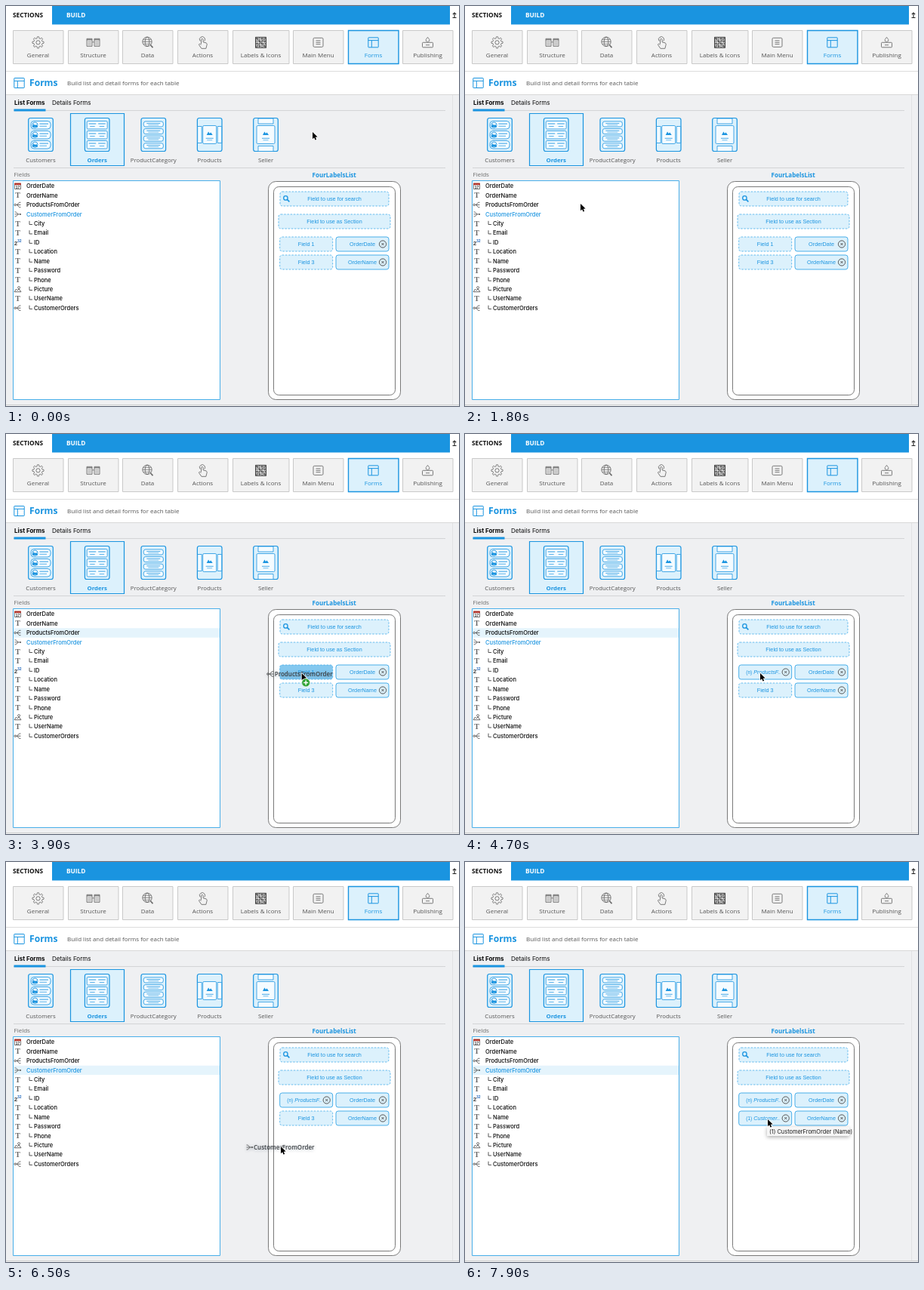
Recreate the animation shown at these times as an HTML page with a canvas. Size 600 by 530 pixels, loop 8000 ms.

```html
<!DOCTYPE html>
<html lang="en">
<head>
<meta charset="utf-8">
<title>Form builder</title>
<style>
html, body { margin: 0; width: 100%; height: 100%; overflow: hidden; background: #fff; }
canvas { display: block; width: 600px; height: 530px; }
</style>
</head>
<body>
<canvas id="stage"></canvas>
<script>
const W = 600, H = 530, LOOP = 8000;
const BLUE = '#1a94e0', SOFT = '#48aee9', PALE = '#dcf1fc', GREY = '#6b6b6b', INK = '#080808';
const SANS = '"Open Sans", "Noto Sans", sans-serif';
const UI = 'Inter, Roboto, sans-serif';
const HELV = '"Liberation Sans", Arial, sans-serif';

const canvas = document.getElementById('stage');
const dpr = window.devicePixelRatio || 1;
canvas.width = W * dpr;
canvas.height = H * dpr;
const c = canvas.getContext('2d');

// ---------- drawing helpers ----------
function text(s, x, y, font, color, align = 'left') {
  c.font = font;
  c.fillStyle = color;
  c.textAlign = align;
  c.fillText(s, x, y);
}

function box(x, y, w, h, { fill, stroke, r = 0, lw = 1, dash = [] } = {}) {
  c.beginPath();
  c.roundRect(x, y, w, h, r);
  if (fill) { c.fillStyle = fill; c.fill(); }
  if (stroke) {
    c.strokeStyle = stroke;
    c.lineWidth = lw;
    c.setLineDash(dash);
    c.stroke();
    c.setLineDash([]);
  }
}

function line(color, lw, ...p) {
  c.beginPath();
  c.moveTo(p[0], p[1]);
  for (let i = 2; i < p.length; i += 2) c.lineTo(p[i], p[i + 1]);
  c.strokeStyle = color;
  c.lineWidth = lw;
  c.stroke();
}

function circle(x, y, r, { fill, stroke, lw = 1 }) {
  c.beginPath();
  c.arc(x, y, r, 0, Math.PI * 2);
  if (fill) { c.fillStyle = fill; c.fill(); }
  if (stroke) { c.strokeStyle = stroke; c.lineWidth = lw; c.stroke(); }
}

function at(x, y, draw) {
  c.save();
  c.translate(x, y);
  draw();
  c.restore();
}

// ---------- toolbar icons, centred on 0,0 ----------
function gear() {
  c.beginPath();
  for (let i = 0; i <= 96; i++) {
    const a = i / 96 * Math.PI * 2;
    const r = 6.6 + 1.1 * Math.tanh(3 * Math.cos(8 * a));
    c.lineTo(r * Math.cos(a), r * Math.sin(a));
  }
  c.strokeStyle = GREY;
  c.lineWidth = 0.9;
  c.stroke();
  circle(0, 0, 2.6, { stroke: GREY, lw: 0.9 });
}

function tables() {
  for (const x of [-8.5, 1.5]) {
    box(x, -5, 7, 10, { stroke: GREY, lw: 0.9 });
    line(GREY, 1.2, x, -3.5, x + 7, -3.5);
    for (const y of [-1, 1, 3]) line(GREY, 0.6, x + 1.2, y, x + 5.8, y);
  }
  line(GREY, 0.8, -1.5, -0.5, 1.5, -0.5);
}

function globe() {
  circle(-0.5, -1, 6.2, { stroke: GREY, lw: 0.9 });
  c.beginPath();
  c.ellipse(-0.5, -1, 2.8, 6.2, 0, 0, Math.PI * 2);
  c.stroke();
  line(GREY, 0.8, -6.5, -1, 5.5, -1);
  line(GREY, 0.7, -5.6, -4, 4.6, -4);
  line(GREY, 0.7, -5.6, 2, 4.6, 2);
  line(GREY, 1.6, 4, 3.5, 7, 6.8);
}

function hand() {
  c.beginPath();
  c.arc(-0.5, -4, 3.6, Math.PI * 0.8, Math.PI * 2.2);
  c.strokeStyle = GREY;
  c.lineWidth = 0.9;
  c.stroke();
  c.beginPath();
  c.moveTo(-2, 2);
  c.lineTo(-2, -4);
  c.quadraticCurveTo(-0.7, -6, 0.6, -4);
  c.lineTo(0.6, -0.5);
  c.lineTo(4.6, 0.6);
  c.quadraticCurveTo(6.2, 1.2, 5.6, 3.2);
  c.lineTo(4.4, 8);
  c.lineTo(-1.6, 8);
  c.lineTo(-5, 3);
  c.quadraticCurveTo(-4.6, 0.8, -2, 3);
  c.stroke();
}

function iconGrid() {
  box(-7, -7, 14, 14, { stroke: '#444', lw: 1 });
  for (let i = 0; i < 4; i++) {
    for (let j = 0; j < 4; j++) {
      const x = -5 + i * 3.35, y = -5 + j * 3.35;
      if ((i + j) % 2) circle(x, y, 1.2, { stroke: '#444', lw: 0.8 });
      else box(x - 1.2, y - 1.2, 2.4, 2.4, { fill: '#555' });
    }
  }
  line('#444', 0.7, -7, -7, 7, 7);
  line('#444', 0.7, 7, -7, -7, 7);
}

function menu() {
  box(-6.5, -6, 13, 12, { stroke: GREY, lw: 0.9, r: 1.5 });
  for (const y of [-2.4, 0, 2.4]) line(GREY, 0.9, -3, y, 3, y);
}

function layout() {
  box(-6.7, -6.5, 13.4, 13, { stroke: BLUE, lw: 1, r: 0.5 });
  line(BLUE, 1, -6.7, -2.7, 6.7, -2.7);
  line(BLUE, 1, -2.2, -2.7, -2.2, 6.5);
}

function publish() {
  box(-7, 0, 14, 6.5, { stroke: GREY, lw: 0.9, r: 1 });
  c.beginPath();
  c.moveTo(0, -7);
  c.quadraticCurveTo(3.4, -3.4, 2.2, -1.8);
  c.quadraticCurveTo(0, 0, -2.2, -1.8);
  c.quadraticCurveTo(-3.4, -3.4, 0, -7);
  c.fillStyle = '#f2f2f2';
  c.fill();
  c.lineWidth = 0.8;
  c.stroke();
  line(GREY, 0.9, -2.5, 3.4, 2.5, 3.4);
}

const TOOLS = [
  ['General', 9, 67, gear], ['Structure', 82, 67, tables], ['Data', 154, 67, globe],
  ['Actions', 227, 67, hand], ['Labels & Icons', 300, 75, iconGrid],
  ['Main Menu', 380, 67, menu], ['Forms', 453, 67, layout], ['Publishing', 525, 67, publish]
];

// ---------- template thumbnails, centred on x = 0, top at y = 0 ----------
const thin = { stroke: BLUE, lw: 0.8, r: 1.5, fill: '#f4fbff' };

function peak(x, y) {
  c.beginPath();
  c.moveTo(x - 4, y + 2.5);
  c.lineTo(x - 1.6, y - 2);
  c.lineTo(x, y + 0.4);
  c.lineTo(x + 1.6, y - 1.2);
  c.lineTo(x + 4, y + 2.5);
  c.fillStyle = BLUE;
  c.fill();
}

function peopleRows() {
  for (let y = 4; y < 40; y += 13) {
    box(-13, y, 26, 10.5, { ...thin, r: 4 });
    circle(-7.6, y + 5.2, 3.6, { fill: '#fff', stroke: BLUE, lw: 0.9 });
    peak(-7.6, y + 5.4);
    line(BLUE, 0.9, -1.5, y + 3.6, 10, y + 3.6);
    line(BLUE, 0.7, -1.5, y + 6.8, 8, y + 6.8);
  }
}

function labelRows() {
  for (let y = 4; y < 40; y += 13) {
    box(-13.5, y, 27, 10.5, thin);
    for (const x of [-11, 1.5]) {
      line(BLUE, 0.9, x, y + 3.5, x + 9.5, y + 3.5);
      line(BLUE, 0.7, x + 1.5, y + 7, x + 8, y + 7);
    }
  }
}

function pillRows() {
  for (let y = 4.5; y < 40; y += 9.6) {
    box(-13, y, 26, 7, { ...thin, r: 2.5 });
    line(BLUE, 0.8, -9, y + 2.6, 9, y + 2.6);
    line(BLUE, 0.6, -7, y + 4.7, 7, y + 4.7);
  }
}

function bigCard(x, y, w, h) {
  box(x, y, w, h, thin);
  peak(0, y + h * 0.42);
  line(BLUE, 0.8, -5, y + h * 0.7, 5, y + h * 0.7);
  line(BLUE, 0.6, -3.5, y + h * 0.8, 3.5, y + h * 0.8);
}

function sideCards() {
  for (const x of [-16, 10.5]) box(x, 11, 5.5, 22, { ...thin, r: 0 });
  bigCard(-9, 10, 18, 24);
}

function stackCards() {
  for (const y of [0.5, 37]) box(-10, y, 20, 7, { ...thin, r: 0 });
  bigCard(-12, 10, 24, 24);
}

const CARDS = [
  ['Customers', 46, peopleRows], ['Orders', 120.7, labelRows], ['ProductCategory', 195.3, pillRows],
  ['Products', 269.7, sideCards], ['Seller', 344, stackCards]
];

// ---------- field list icons, centred on 0,0 ----------
function calendar() {
  box(-4, -3.4, 8, 7.4, { stroke: '#555', lw: 0.8, fill: '#fff' });
  box(-4.4, -4, 8.8, 2.6, { fill: '#b5382f' });
  text('17', 0, 3.4, `bold 5px ${HELV}`, '#333', 'center');
}
function letter() {
  text('T', 0, 3.4, 'bold 10px "Liberation Serif", "Noto Serif", serif', '#6a6a6a', 'center');
}
function toMany() {
  circle(-3.4, 0, 1.2, { stroke: '#444', lw: 0.8 });
  line('#444', 0.8, -2.2, 0, 4, 0);
  line('#444', 0.8, 4, -3.2, 2, -3.2, -1, 0, 2, 3.2, 4, 3.2);
}
function toOne() {
  line('#555', 0.8, -4, 0, 4.5, 0);
  line('#555', 0.8, -4, -3, -2.4, -3, 0.8, 0, -2.4, 3, -4, 3);
  circle(3.6, 0, 0.9, { fill: '#555' });
}
function number() {
  text('2', -2.6, 3.4, `bold 8px ${HELV}`, '#444', 'center');
  text('32', 2.2, -0.2, `bold 5px ${HELV}`, '#2b6fc0', 'center');
}
function picture() {
  line('#555', 0.9, -4.5, 3.4, 4.5, 3.4, 1.6, -0.4, -0.2, 1.6, -2, -0.2, -4.5, 3.4);
  circle(1.6, -2.2, 1.5, { stroke: '#555', lw: 0.8 });
}

const FIELDS = [
  ['OrderDate', calendar], ['OrderName', letter], ['ProductsFromOrder', toMany],
  ['CustomerFromOrder', toOne], ['City', letter, 1], ['Email', letter, 1], ['ID', number, 1],
  ['Location', letter, 1], ['Name', letter, 1], ['Password', letter, 1], ['Phone', letter, 1],
  ['Picture', picture, 1], ['UserName', letter, 1], ['CustomerOrders', toMany, 1]
];
const ROW = 12.43, ROW0 = 238.6;

// ---------- timeline ----------
const PATH = [
  [0, 406, 167], [300, 406, 167], [900, 300, 210], [1500, 156, 261], [1800, 153, 262],
  [2250, 56, 262], [2450, 56, 262], [2800, 245, 260], [2900, 303, 264], [3350, 392, 317],
  [4800, 391, 317], [5200, 391, 317], [5700, 80, 274], [5850, 57, 275], [5980, 57, 275],
  [6400, 364, 377], [6520, 364, 377], [6850, 401, 341], [8000, 401, 341]
];
const DRAGS = [
  { row: 2, from: 2400, to: 4250, slot: 0 },
  { row: 3, from: 5930, to: 7100, slot: 1 }
];
const TIPS = [
  { from: 4900, to: 5800, x: 390, y: 328, w: 80, s: '(n) ProductsFromOrder' },
  { from: 7450, to: 8000, x: 400, y: 351, w: 109, s: '(1) CustomerFromOrder (Name)' }
];
const LAG = 80;

// monotone cubic through the path points
function coord(t, k) {
  const slope = i => (PATH[i + 1][k] - PATH[i][k]) / (PATH[i + 1][0] - PATH[i][0]);
  const tangent = i => {
    if (i < 1 || i >= PATH.length - 1) return 0;
    const a = slope(i - 1), b = slope(i);
    return a * b > 0 ? 2 * a * b / (a + b) : 0;
  };
  let i = 0;
  while (i < PATH.length - 2 && t >= PATH[i + 1][0]) i++;
  const h = PATH[i + 1][0] - PATH[i][0];
  const u = Math.min(1, Math.max(0, (t - PATH[i][0]) / h)), v = 1 - u;
  return PATH[i][k] * v * v * (1 + 2 * u) + PATH[i + 1][k] * u * u * (3 - 2 * u)
    + h * (tangent(i) * u * v * v - tangent(i + 1) * u * u * v);
}
const pointer = t => ({ x: coord(t, 1), y: coord(t, 2) });

// ---------- page parts ----------
function header() {
  box(0, 0, W, H, { fill: '#fff' });
  box(61, 0, 527, 24.4, { fill: BLUE });
  text('SECTIONS', 9, 15.4, `bold 8.3px ${SANS}`, '#111');
  text('BUILD', 80, 15.4, `bold 8.3px ${SANS}`, '#fff');
  line('#222', 1.1, 594, 15, 594, 9);
  line('#222', 1.1, 591.8, 11.2, 594, 9, 596.2, 11.2);
  line('#222', 1, 591.5, 15.5, 596.5, 15.5);

  for (const [name, x, w, icon] of TOOLS) {
    const on = name === 'Forms';
    box(x + 0.5, 32.5, w - 0.5, 44, {
      fill: on ? PALE : '#f2f2f2', stroke: on ? BLUE : '#c9c9c9', lw: on ? 1.4 : 1
    });
    at(x + w / 2, 48.3, icon);
    text(name, x + w / 2, 68.3, `8px ${SANS}`, on ? BLUE : '#555', 'center');
  }

  line('#dcdcdc', 1, 0, 86.5, W, 86.5);
  at(17.5, 102, layout);
  text('Forms', 31, 106.4, `bold 12.1px ${SANS}`, BLUE);
  text('Build list and detail forms for each table', 81, 105.2, `8px ${SANS}`, '#555');
}

function templates() {
  box(0, 118, W, H - 118, { fill: '#eff0f2' });
  line('#d8d8d8', 1, 0, 117.5, W, 117.5);
  line('#e2e2e4', 1, 591.5, 118, 591.5, 528);
  line('#cfcfcf', 1, 0, 528.5, W, 528.5);
  text('List Forms', 11, 131.3, `bold 8px ${UI}`, INK);
  text('Details Forms', 61, 131.3, `8px ${UI}`, INK);
  line('#d3d4d6', 1, 10, 138.5, 582, 138.5);
  box(10.5, 136.5, 42, 3, { fill: BLUE });

  for (const [name, x, art] of CARDS) {
    const on = name === 'Orders';
    if (on) box(85.5, 142.5, 71, 69, { fill: PALE, stroke: BLUE, lw: 1.2 });
    at(x, 148.5, () => {
      box(-16.3, 0, 32.6, 44, { fill: PALE, stroke: BLUE, lw: 1.2, r: 2.5 });
      art();
    });
    text(name, x, 207, `${on ? 'bold ' : ''}7.8px ${SANS}`, on ? BLUE : '#555', 'center');
  }
  line('#d3d4d6', 1, 10, 214.5, 582, 214.5);
}

function fieldList(picked) {
  text('Fields', 10.5, 226.3, `8px ${SANS}`, GREY);
  box(9.5, 231.5, 274, 290, { fill: '#fff', stroke: SOFT });
  if (picked >= 0) box(10, ROW0 + picked * ROW - 6.2, 273, ROW, { fill: '#e5f4fc' });
  FIELDS.forEach(([name, icon, child], i) => {
    const y = ROW0 + i * ROW;
    at(15.5, y, icon);
    if (child) line('#444', 0.9, 31, y - 3.5, 31, y + 1.2, 35, y + 1.2);
    text(name, child ? 37 : 27, y + 2.7, `500 7.5px ${UI}`, i === 3 ? BLUE : INK);
  });
}

function closeMark(x, y) {
  circle(x, y, 4.6, { stroke: '#555', lw: 1 });
  line('#555', 1, x - 1.6, y - 1.6, x + 1.6, y + 1.6);
  line('#555', 1, x + 1.6, y - 1.6, x - 1.6, y + 1.6);
}

function slot(x, y, w, label, { filled, hot, tag } = {}) {
  box(x, y, w, 19, {
    fill: hot ? '#84c8ef' : PALE, stroke: SOFT, lw: filled ? 1 : 0.8,
    r: 3, dash: filled ? [] : [2.6, 1.6]
  });
  const base = y + 12.2;
  if (tag) {
    text(tag, x + 9.5, base, `6.6px ${HELV}`, BLUE);
    text(label, x + 19.5, base, `italic 7.25px ${HELV}`, BLUE);
  } else {
    text(label, x + w / 2, base, `7.25px ${HELV}`, BLUE, 'center');
  }
  if (filled) closeMark(x + w - 8, y + 9.5);
}

function phone(done, hot) {
  text('FourLabelsList', 434.7, 227, `bold 8px ${SANS}`, BLUE, 'center');
  box(347.5, 232.5, 175, 289, { fill: '#fff', stroke: '#6a6a6a', lw: 0.9, r: 10 });
  box(354.5, 239.5, 161, 276, { stroke: '#6a6a6a', lw: 0.9, r: 7 });
  slot(363, 246, 144, 'Field to use for search');
  circle(370.4, 254.4, 2.7, { stroke: BLUE, lw: 1.3 });
  line(BLUE, 1.6, 372.4, 256.4, 375.4, 259.4);
  slot(361, 276, 148, 'Field to use as Section');
  const left = [['Field 1', 'ProductsF..', '(n)'], ['Field 3', 'Customer..', '(1)']];
  const right = ['OrderDate', 'OrderName'];
  for (let i = 0; i < 2; i++) {
    const y = 306 + i * 24, [empty, full, tag] = left[i];
    if (done[i]) slot(362.7, y, 70, full, { filled: true, tag });
    else slot(362.7, y, 70, empty, { hot: hot === i });
    slot(437, y, 70, right[i], { filled: true });
  }
}

function ghost(drag, t) {
  const p = pointer(t - LAG);
  const [name, icon] = FIELDS[drag.row];
  at(p.x - 41.5, p.y + 1, () => {
    c.shadowColor = 'rgba(40,60,80,0.35)';
    c.shadowBlur = 4 * dpr;
    c.shadowOffsetY = dpr;
    icon();
    text(name, 5.5, 2.9, `600 8px ${SANS}`, '#3f4347');
  });
}

function tooltip({ x, y, w, s }) {
  c.save();
  c.shadowColor = 'rgba(0,0,0,0.35)';
  c.shadowBlur = 5 * dpr;
  c.shadowOffsetY = 1.5 * dpr;
  box(x, y, w, 12, { fill: '#f6f6f6' });
  c.restore();
  text(s, x + 3, y + 8.7, `7.4px ${UI}`, '#1a1a1a');
}

function cursor({ x, y }) {
  at(x, y, () => {
    c.beginPath();
    [[0, 0], [0, 9.2], [2.1, 7.3], [3.5, 10.6], [5.2, 9.9], [3.8, 6.7], [6.6, 6.6]]
      .forEach(([a, b]) => c.lineTo(a, b));
    c.closePath();
    c.lineJoin = 'round';
    c.strokeStyle = '#fff';
    c.lineWidth = 1.6;
    c.stroke();
    c.fillStyle = '#000';
    c.fill();
  });
}

function plusBadge({ x, y }) {
  at(x + 5.5, y + 12.5, () => {
    circle(0, 0, 5.4, { fill: '#2fa336', stroke: '#e8f5e8', lw: 0.8 });
    line('#fff', 1.5, -3, 0, 3, 0);
    line('#fff', 1.5, 0, -3, 0, 3);
  });
}

function draw(t) {
  c.setTransform(dpr, 0, 0, dpr, 0, 0);
  const p = pointer(t);
  const drag = DRAGS.find(d => t >= d.from && t < d.to);
  const last = DRAGS.filter(d => t >= d.from).pop();
  const done = DRAGS.map(d => t >= d.to);
  const over = drag && p.x > 363 && p.x < 433
    ? [0, 1].find(i => p.y > 306 + i * 24 && p.y < 325 + i * 24) : undefined;

  header();
  templates();
  fieldList(last ? last.row : -1);
  phone(done, over);
  TIPS.filter(d => t >= d.from && t < d.to).forEach(tooltip);
  if (drag) ghost(drag, t);
  cursor(p);
  if (over !== undefined) plusBadge(p);
}

const start = performance.now();
function tick() {
  draw((performance.now() - start) % LOOP);
  requestAnimationFrame(tick);
}
tick();
</script>
</body>
</html>
```
